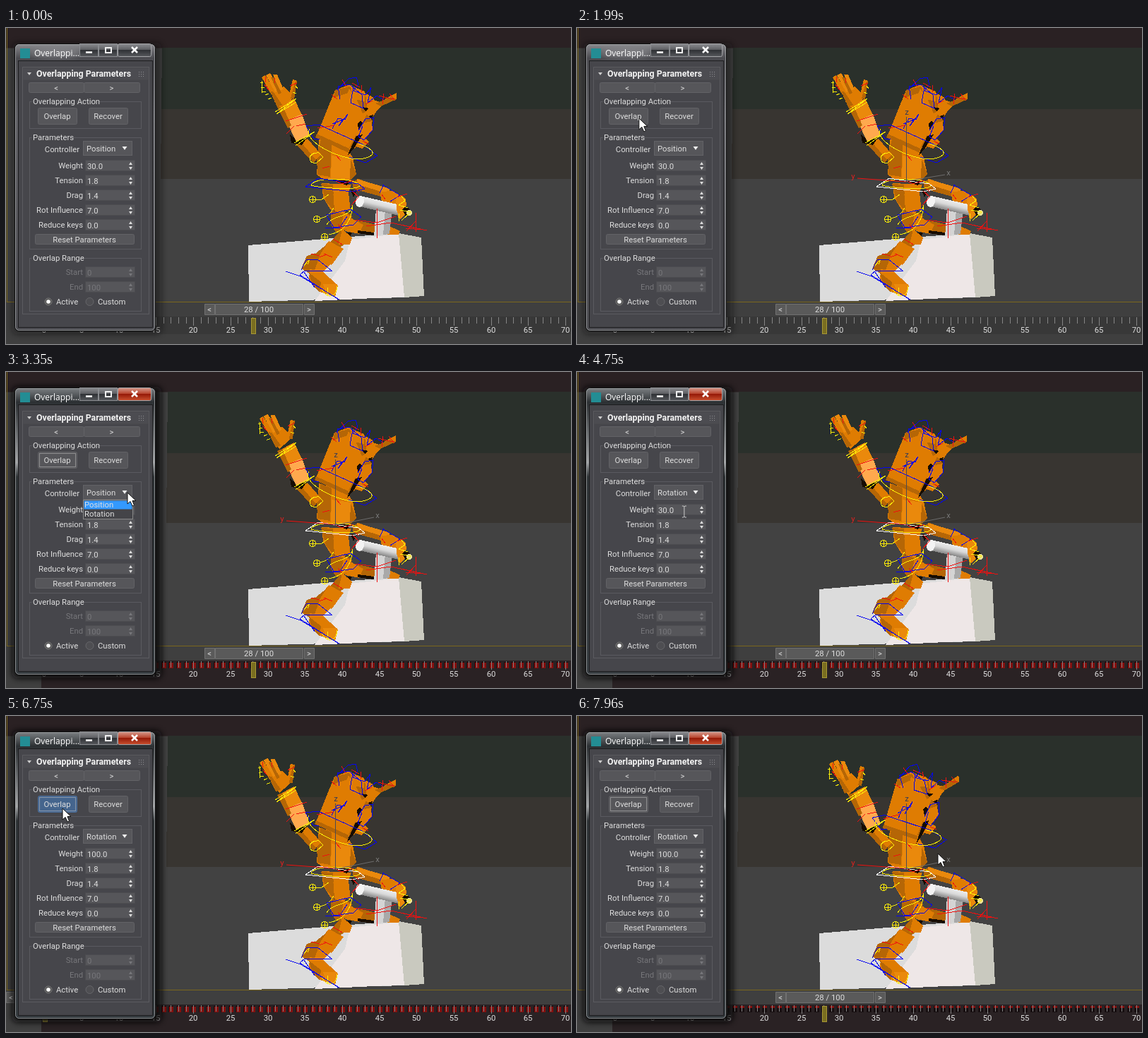
Recreate the animation shown at these times as an HTML page. Size 800 px wide and 448 px high, loop 8000 ms.

```html
<!DOCTYPE html>
<html lang="en">
<head>
<meta charset="utf-8">
<title>Overlapping Parameters</title>
<style>
html, body { margin: 0; width: 100%; height: 100%; overflow: hidden; background: #2a2123; }
svg { display: block; width: 100vw; height: 100vh; }
text { font: 11.3px Roboto, "Noto Sans", sans-serif; fill: #dedede; }
.mid { text-anchor: middle; } .end { text-anchor: end; }
.crisp { shape-rendering: crispEdges; }
.o { fill: #df7c02; } .l { fill: #ea890c; } .h { fill: #ffa94e; } .d { fill: #b56606; } .k { fill: #160c02; }
.b, .y, .r, .w { fill: none; stroke-width: 1; }
.b { stroke: #0505f0; } .y { stroke: #ffee08; } .r { stroke: #f01010; } .w { stroke: #fff; }
.btn { fill: #56565a; stroke: #626266; } .field { fill: #56565a; stroke: #4c4c50; }
.group { fill: none; stroke: #5a5a60; }
.off { fill: #77777b; }
</style>
</head>
<body>
<svg viewBox="0 0 800 448" preserveAspectRatio="none">
<defs>
  <linearGradient id="glassIdle" x2="0" y2="1"><stop stop-color="#8b8b8f"/><stop offset=".05" stop-color="#4b4b50"/><stop offset=".25" stop-color="#606065"/><stop offset="1" stop-color="#4c4c51"/></linearGradient>
  <linearGradient id="glassActive" x2="0" y2="1"><stop stop-color="#7d8184"/><stop offset=".05" stop-color="#2c3033"/><stop offset=".26" stop-color="#a2a4a6"/><stop offset=".31" stop-color="#2f3437"/><stop offset="1" stop-color="#363c40"/></linearGradient>
  <linearGradient id="red" x2="0" y2="1"><stop stop-color="#d79a8c"/><stop offset=".45" stop-color="#b8452f"/><stop offset=".5" stop-color="#961a08"/><stop offset="1" stop-color="#c9502f"/></linearGradient>
  <linearGradient id="grey" x2="0" y2="1"><stop stop-color="#8c8d91"/><stop offset=".48" stop-color="#5b5c60"/><stop offset=".5" stop-color="#303236"/><stop offset="1" stop-color="#56585c"/></linearGradient>
  <linearGradient id="bar" x2="0" y2="1"><stop stop-color="#eee"/><stop offset=".45" stop-color="#d8d8d8"/><stop offset="1" stop-color="#858585"/></linearGradient>
  <filter id="blur" x="-30%" y="-30%" width="160%" height="160%"><feGaussianBlur stdDeviation="4"/></filter>
</defs>

<rect width="800" height="448" fill="#424242"/>
<rect width="800" height="28.5" fill="#2a2123"/>
<g id="bands" class="crisp">
  <path fill="#2a302b" d="M221 28H801V115H220z"/>
  <path fill="#383531" d="M220 115H801V214H219z"/>
</g>

<g id="poseA" class="crisp">
  <path fill="#dcdcdc" d="M343 308 487 296 556 291 564 382 344 388z"/>
  <path fill="#eee7e7" d="M487 300 556 292 564 381 437 387 480 330z"/>
  <path fill="#c9c9bf" d="M556 291 588 297 592 380 564 382z"/>
  <path class="d" d="M484 270 512 276 545 284 558 292 494 291z"/>
  <path class="o" d="M486 268 506 279 500 292 480 288zM541 280 558 288 556 293 540 293z"/>
  <path class="k" d="M498 287 521 290 521 294 498 291zM472 290 490 290 482 306z"/>
  <path fill="#d4d4d4" d="M524 257 537 257 534 293 521 295z"/><path fill="#a9a9a9" d="M537 257 547 256 543 292 534 293z"/>
  <g id="frontArm">
    <path class="d" d="M490 218 500 214 546 232 538 241 492 228z"/>
    <path class="l" d="M497 214 544 228 541 235 498 222z"/>
    <path class="o" d="M529 232 549 231 564 240 563 266 556 271 550 252 532 246z"/>
    <path class="k" d="M488 230 496 231 492 240zM560 255 568 254 573 259 569 267 561 264z"/>
  </g>
  <g transform="translate(501 246) rotate(13)"><rect y="-8" width="57" height="15" fill="url(#bar)"/><ellipse rx="6" ry="8" fill="#f3f3f3"/></g>
  <path class="l" d="M552 237 566 242 567 251 561 257 565 265 558 271 553 258z"/>
  <circle cx="571" cy="262" r="4" fill="#e8df92"/>
  <!-- near leg -->
  <path class="d" d="M460 259 489 263 483 285 468 291 460 279z"/><path class="o" d="M478 262 490 267 484 284 474 289z"/>
  <path class="d" d="M474 287 456 307 466 318 485 301z"/><path class="o" d="M476 285 490 297 487 307 471 307z"/>
  <path class="o" d="M457 302 478 313 461 336 441 322z"/><path class="d" d="M444 315 454 307 437 333 426 330zM426 323 438 319 430 348 418 341z"/>
  <path class="o" d="M436 320 461 333 446 349 427 341z"/><path class="d" d="M436 320 444 324 436 346 424 342z"/>
  <path class="o" d="M430 342 448 345 470 365 466 381 444 374 429 358z"/><path class="d" d="M429 347 446 360 444 375 433 363z"/>
  <path class="l" d="M449 363 469 363 466 380 453 377z"/>
  <!-- body -->
  <path class="o" d="M447 220 489 222 483 238 486 251 478 264 459 257 449 240z"/><path class="d" d="M446 221 463 222 465 260 453 246z"/>
  <path class="o" d="M463 236 485 233 488 260 473 257z"/>
  <path class="o" d="M443 158 483 170 491 184 496 207 487 216 450 215 440 208z"/>
  <path class="d" d="M446 158 461 165 459 211 441 208 440 181zM487 184 496 207 487 216z"/>
  <path class="l" d="M461 181 488 185 487 214 460 213z"/>
  <path class="k" d="M460 215 488 217 482 223z"/>
  <!-- raised arm -->
  <path class="o" d="M410 164 427 157 446 179 435 191z"/><path class="d" d="M410 164 417 161 439 187 435 191z"/>
  <path class="k" d="M402 151 411 158 427 154 419 166 404 163z"/>
  <path class="l" d="M385 112 408 100 419 123 397 133z"/><path class="h" d="M397 132 419 122 430 153 411 161z"/>
  <path class="d" d="M384 112 391 109 404 138 399 142z"/>
  <g id="hand">
    <path class="o" d="M374 89 394 83 408 98 389 114 381 106zM362 70 367 67 383 92 376 95zM401 94 406 73 412 75 407 101z"/>
    <path class="l" d="M368 67 374 64 388 87 381 91zM378 66 384 66 393 87 386 89z"/>
    <path class="d" d="M374 89 379 91 391 109 384 112zM375 70 379 70 390 92 386 94zM409 77 412 75 408 101 403 100z"/>
    <path class="y" d="M360 77H364M361 84H366M362 90H368M367 95 372 93M371 101 376 99M410 82 413 86M406 91 411 93M362 75V92"/>
    <path class="r" d="M367 69V77M380 71V78M402 82 412 78M366 80 372 88"/>
  </g>
  <!-- head -->
  <g id="head">
    <path class="o" d="M466 88 487 80 521 99 524 119 506 145 485 175 440 152z"/>
    <path class="d" d="M440 150 486 171 485 177 438 155z"/>
    <path class="o" d="M468 101 511 121 486 171 443 151z"/>
    <path class="d" d="M511 122 519 132 494 171 486 170zM483 82 507 94 519 113 505 121 496 100zM466 88 487 83 484 92 464 99z"/>
    <path class="o" d="M489 82 508 90 508 104 490 100zM510 99 530 105 545 96 553 92 553 101 531 111 522 120 511 117z"/>
    <path class="d" d="M523 107 545 98 553 101 531 111z"/><path class="o" d="M499 136 518 132 519 145 508 156 514 161 504 171 493 167z"/>
    <path class="k" d="M505 112 514 114 509 118zM498 135 502 131 505 135 499 144zM496 153 505 151 493 170 483 182zM513 125 520 123 518 129z"/>
    <path class="b" d="M468 88 485 72 496 70 499 80 492 89 509 95 517 84 512 106 525 96 535 102M473 101 470 83 487 80 504 95 506 114 488 106 492 83M462 143 470 128 480 130 484 122 471 139 477 130 462 136M499 145 509 129 521 127 519 145 507 159 499 154 505 139"/>
    <path class="r" d="M476 73 482 83M490 78 501 84M461 94 469 101M528 96 548 101M535 93 533 108M543 93 551 103M509 108 519 103M503 81V91M441 142 465 138M505 160 514 165"/>
    <path class="b" d="M425 139 443 137 505 165 526 181 509 191 486 183M425 139 436 157 444 157"/>
    <path class="y" d="M430 143C418 161 480 191 506 185S514 169 499 164"/>
  </g>
  <!-- rig curves -->
  <path class="y" d="M439 243H447L457 236M445 270C455 268 461 261 464 255M457 293C473 290 487 282 491 253M381 119 411 100 383 122 411 105M408 163 437 147 410 167M430 183Q434 176 443 177L449 183 440 191Q430 193 430 183M454 279C462 264 488 270 491 251M560 238 565 245 556 251 569 255M558 258 573 261 560 273M556 263V274M427 335 430 328 418 341M447 370C456 387 468 380 469 366M455 368V379"/>
  <g class="y"><circle cx="434" cy="243" r="4.5"/><circle cx="440" cy="271" r="4.5"/><circle cx="451" cy="296" r="4.5"/><path d="M429 243H439M434 238V248M435 271H445M440 266V276M446 296H456M451 291V301"/></g>
  <path class="y" d="M432 223C434 211 497 211 501 224 492 232 438 225 432 223"/>
  <path id="hipRing" class="b" d="M424 225 442 213 499 221 508 228 491 232 424 225"/>
  <path class="b" d="M454 265 488 257 503 268 492 279 464 283 454 265M452 283 472 284 483 267M396 345 417 352 472 385M418 343 425 329 441 328 461 344H423L416 350 471 385M422 346 437 368M533 222 558 237 544 246M535 222 529 234"/>
  <path class="r" d="M396 132 426 122M397 150 408 139M411 139 424 136M448 199 458 196M467 180 474 188M467 217 476 221 492 216M490 231 500 240M488 252 500 239M470 278 476 285M463 299 476 307M443 325 452 322M450 320 462 325M432 320 444 323M537 243 532 236M553 240 568 235M494 272 525 276 552 267M525 256V298M510 281 545 276 596 287M580 262V289M566 284 589 286M567 288 580 274M494 227 500 233"/>
</g>

<g id="poseB" class="crisp">
  <path fill="#aeb3ad" d="M349 281 413 265 592 277 533 293z"/>
  <path fill="#cdcdc4" d="M349 281 533 293 537 384 353 361z"/>
  <path fill="#dedede" d="M533 293 592 277 595 362 537 384z"/>
  <path class="d" d="M487 246 514 249 513 267 490 263zM541 246 553 250 555 272 542 283z"/>
  <path class="o" d="M493 258 512 260 510 266 491 264z"/><path class="k" d="M544 250 551 254 550 273 544 271z"/>
  <path fill="#d4d4cf" d="M512 245 543 242 542 283 526 289 511 286z"/>
  <path class="o" d="M455 207 487 211 483 231 492 249 478 264 457 248z"/><path class="d" d="M454 207 467 209 471 250 458 245zM456 252 476 263 476 294 464 290 457 270z"/>
  <path class="o" d="M465 263 477 270 482 292 468 312 446 302 461 292z"/>
  <path class="o" d="M455 292 477 302 451 326 430 318z"/><path class="d" d="M452 291 465 289 425 323 407 331 420 313z"/>
  <path class="o" d="M420 313 449 321 430 334 408 334zM410 330 426 329 447 362 455 367 452 377 430 375 421 355z"/>
  <path class="d" d="M408 332 416 332 434 363 436 376 421 362z"/><path class="o" d="M424 330 432 328 452 360 440 364z"/>
  <path class="l" d="M447 150 505 160 498 190 486 213 457 209 446 187z"/>
  <path class="d" d="M447 150 468 155 463 192 444 187z"/><path class="o" d="M461 190 490 194 486 214 457 208z"/>
  <path class="k" d="M455 190 465 192 462 196zM480 156 505 159 503 166z"/>
  <path class="d" d="M500 178 510 182 538 203 530 215 497 190z"/><path class="l" d="M507 180 541 201 534 208 503 187z"/>
  <path class="o" d="M529 205 547 207 563 216 571 223 568 243 547 236 530 220z"/>
  <g transform="translate(471 254) rotate(-14)"><rect y="-7" width="86" height="13" fill="url(#bar)"/><rect x="104" y="-6" width="17" height="12" fill="#ddd"/><ellipse rx="5" ry="7" fill="#eee"/></g>
  <path class="l" d="M540 209 562 219 574 219 569 228 575 235 559 242 547 228z"/><path class="d" d="M548 221 556 230 565 236 557 240z"/>
  <path class="o" d="M411 137 428 129 449 153 439 159 421 149z"/><path class="k" d="M402 132 413 140 434 134 419 143 402 137z"/>
  <path class="h" d="M380 86 405 75 429 128 404 139z"/><path class="l" d="M394 72 404 74 408 84 384 95 380 86z"/>
  <path class="h" d="M366 58 391 52 402 68 387 84 371 76zM356 42 361 39 374 58 368 62zM361 35 367 32 382 56 375 60zM372 31 377 31 388 53 381 56zM382 35 387 35 396 57 389 59z"/>
  <path class="d" d="M397 59 400 44 407 47 405 76 398 69zM367 34 370 34 381 56 378 59zM377 33 380 34 389 55 386 57z"/>
  <path class="o" d="M463 71 479 53 503 45 523 57 523 74 530 91 523 141 490 154 448 127z"/>
  <path class="o" d="M465 69 504 88 488 151 449 127z"/><path class="d" d="M504 88 529 90 522 142 489 152zM469 63 489 52 505 65 523 59 522 79 503 88 480 78z"/>
  <path class="o" d="M478 53 499 46 519 56 500 63zM496 65 523 60 521 75 500 81zM499 103 526 101 527 118 511 133 523 139 501 144 490 135z"/>
  <path class="l" d="M520 73 547 67 548 75 524 83z"/><path class="k" d="M505 86 527 84 522 89zM504 122 512 117 506 132zM492 148 522 143 494 153z"/>
  <path class="b" d="M467 62 480 42 509 39 535 59 527 79 503 92 473 76zM472 78 483 54 517 51 524 69 510 86 490 66 480 65M499 120 504 102 525 105 527 126M456 119 468 105 475 108M457 113 469 121 465 132M424 118 448 111 535 139 537 158 496 153 435 140zM388 330 409 326 448 364 456 375 429 379zM409 332 452 342H425L408 325M465 245 493 236 515 248 487 260zM542 200 559 208 545 222"/>
  <path class="r" d="M503 72H515M509 66V80M534 74H546M540 68V80"/>
  <path class="y" d="M433 116C426 153 513 177 525 149 526 138 519 133 515 132M378 95 411 76M398 137 430 124M383 64 392 78 407 59M403 60H414M448 211 462 222M449 240 473 235 473 218M455 269 479 257 485 234M448 364Q437 373 449 376 460 366 448 364M529 216 572 218M555 236 564 248 571 238 559 251 573 247M431 157 437 151 447 159 440 163z"/>
  <g class="y"><circle cx="444" cy="211" r="4.5"/><circle cx="446" cy="241" r="4.5"/><circle cx="450" cy="270" r="4.5"/><path d="M439 211H449M444 206V216M441 241H451M446 236V246M445 270H455M450 265V275"/></g>
  <path class="w" stroke-width="2" d="M429 188 438 186 501 194 508 202 486 201 429 192z"/>
  <path class="r" d="M382 88 396 79M393 107 412 98M392 116 407 114M470 150 476 158M468 193V205M477 196 486 206M511 179V193M506 211 523 204M536 205 550 195M538 210 554 219M462 283 479 300M444 296 465 307M437 301 452 317M416 324 420 308M469 61 482 66M492 43 507 52M486 55 490 68M504 69 513 75M521 72 545 74M536 68V82M566 216V231M507 209 515 221M525 255V294M510 276 543 272M512 266 542 281"/>
</g>

<g id="axes">
  <path class="r" id="axisY"/><path id="axisZ" stroke="#4b4a52"/><path id="axisX" stroke="#6c6c6c"/>
  <text id="labelY" class="mid" style="fill:#d22">y</text><text id="labelZ" class="mid" style="fill:#333a58">z</text><text id="labelX" class="mid" style="fill:#777">x</text>
</g>

<path class="crisp" fill="none" stroke="#7b671c" d="M1.500 0V388.500H800"/>
<rect y="389" width="800" height="59" fill="#3f3f3f"/>
<rect id="strip" x="50" y="409" width="750" height="39"/>
<g id="keys" class="crisp"><g id="keyBacks"></g><g id="keyTops"></g></g><g id="ruler"></g>
<g id="thumb">
  <path fill="#5a5a5a" stroke="#707070" d="M281.500 391.500H295.500V406.500H281.500zM296.500 391.500H420.500V406.500H296.500zM422.500 391.500H436.500V406.500H422.500z"/>
  <text class="mid" x="288" y="403">&lt;</text><text class="mid" x="358" y="403">28 / 100</text><text class="mid" x="429" y="403">&gt;</text>
</g>
<rect id="marker" x="347.500" y="411.500" width="6" height="22" fill="#796d20" stroke="#a79835"/>

<g id="panel"></g>
<path id="arrow" fill="#fff" stroke="#111" d="M0 0V16L4 12.500 7 19 9.500 18 7 11.500H12z"/>
<path id="beam" fill="none" stroke="#ccc" d="M-3 -8H-1L0 -7 1 -8H3M0 -7V7M-3 8H-1L0 7 1 8H3"/>
</svg>

<script>
const $ = id => document.getElementById(id);
const show = (id, on) => $(id).style.display = on ? '' : 'none';
const move = (id, x, y) => $(id).setAttribute('transform', `translate(${x} ${y})`);
const rect = (x, y, w, h, attrs) => `<rect x="${x + .5}" y="${y + .5}" width="${w}" height="${h}" ${attrs}/>`;
const text = (x, y, s, attrs = '') => `<text x="${x}" y="${y}" ${attrs}>${s}</text>`;
const button = (x, y, w, h, label, id = '') =>
  rect(x, y, w, h, `class="btn" rx="2" id="${id}"`) + text(x + w / 2, y + h / 2 + 4.5, label, 'class="mid"');
const group = (y, h, label) => rect(33, y, 158, h, 'class="group"') +
  rect(36, y - 4, label.length * 5.3, 8, 'fill="#46464b"') + text(38, y + 4, label);
const spinner = (y, label, value, off = '', id = '') => text(109, y + 4, label, `class="end ${off}"`) +
  rect(112, y - 8, 70, 15, 'class="field"') + text(115, y + 4.5, value, `class="${off}" id="${id}"`) +
  `<path fill="${off ? '#77777b' : '#ddd'}" d="M174 ${y - 1}l2.500 -4 2.500 4zM174 ${y + 2}l2.500 4 2.500 -4z"/>`;

const frameX = f => 54.3 + 10.54 * f;
let ruler = '', keyBacks = '', keyTops = '';
for (let f = 0; f <= 71; f++) {
  const x = Math.round(frameX(f)), major = f % 5 === 0;
  ruler += `<path stroke="#858585" d="M${x + .5} 410V${major ? 422 : 419}"/>`;
  if (major) ruler += text(x, 432, f, 'class="mid"');
  keyBacks += rect(x - 4, 410, 7, 9, 'fill="#170f11"');
  keyTops += rect(x - 3, 411, 6, 8, 'fill="#85100f"');
}
$('ruler').innerHTML = ruler;
$('keyBacks').innerHTML = keyBacks;
$('keyTops').innerHTML = keyTops;

$('panel').innerHTML =
  rect(8, 20, 212, 414, 'id="shadow" rx="8" fill="#08070c" filter="url(#blur)"') +
  rect(12, 22, 199, 407, 'id="frame" rx="6" stroke="#0b0b0c"') +
  rect(13, 23, 197, 405, 'rx="5" fill="none" stroke="#a9abad" opacity=".75"') +
  '<ellipse id="glow" cx="70" cy="36" rx="34" ry="7" fill="#9b9b9f" opacity=".45" filter="url(#blur)"/>' +
  '<rect x="20" y="29" width="14" height="14" fill="#238d94"/>' +
  text(40, 40, 'Overlappi...', 'style="font-size:12px;font-family:\'Open Sans\',sans-serif;fill:#fff"') +
  rect(104, 22, 26, 18, 'fill="url(#grey)" stroke="#8a8c90"') + rect(131, 22, 26, 18, 'fill="url(#grey)" stroke="#8a8c90"') +
  rect(158, 22, 47, 18, 'id="close" stroke="#a3a3a6" rx="2"') +
  '<path stroke="#fff" stroke-width="2.500" fill="none" d="M113 34.500H122M178 27 186 35M186 27 178 35"/><path stroke="#eee" stroke-width="2" fill="none" d="M141 28H149V35H141z"/>' +
  rect(17, 46, 190, 378, 'fill="#46464b" stroke="#1c1c1e"') +
  rect(23, 55, 179, 350, 'fill="none" stroke="#5b5b60"') + rect(24, 56, 177, 17, 'fill="#4c4c51"') +
  '<path fill="#ccc" d="M30 63h6l-3 4z"/><path stroke="#909094" stroke-dasharray="1 2" d="M188 62.500H195M188 65.500H195M188 68.500H195"/>' +
  text(43, 69, 'Overlapping Parameters', 'style="font-weight:700;font-size:12.3px;fill:#f3f3f3"') +
  button(32, 77, 78, 14, '&lt;') + button(110, 77, 79, 14, '&gt;') +
  group(104, 38, 'Overlapping Action') + button(45, 113, 55, 23, 'Overlap', 'overlap') + button(117, 113, 55, 23, 'Recover') +
  rect(47, 115, 51, 19, 'id="focus" fill="none" stroke="#c9c9c9" stroke-dasharray="1 1"') +
  group(155, 158, 'Parameters') + text(104, 176, 'Controller', 'class="end"') +
  rect(109, 160, 69, 20, 'class="btn"') + text(114, 175, '', 'id="controller"') + '<path fill="#eee" d="M164.500 168h7l-3.500 5z"/>' +
  spinner(195, 'Weight', '', '', 'weight') + spinner(216, 'Tension', '1.8') + spinner(237, 'Drag', '1.4') +
  spinner(258, 'Rot Influence', '7.0') + spinner(279, 'Reduce keys', '0.0') + button(41, 292, 140, 14, 'Reset Parameters') +
  group(326, 75, 'Overlap Range') + spinner(346, 'Start', '0', 'off') + spinner(367, 'End', '100', 'off') +
  '<circle cx="60" cy="388" r="5" fill="#555" stroke="#777"/><circle cx="60" cy="388" r="2.800" fill="#fff"/><circle cx="118.500" cy="388" r="5.500" fill="#4e4e52" stroke="#66666a"/>' +
  text(71, 392, 'Active') + text(130, 392, 'Custom') +
  '<g id="popup">' + rect(109, 181, 70, 27, 'fill="#444448" stroke="#888"') + rect(110, 182, 68, 12, 'id="hover" fill="#39f"') +
  text(111, 192, 'Position') + text(111, 205, 'Rotation') + '</g>';

// Cursor waypoints: time, x, y
const path = [[330, 772, 212], [640, 590, 232], [930, 414, 226], [1010, 426, 222], [1750, 426, 222], [1990, 88, 128],
  [2090, 68, 122], [2590, 68, 122], [3230, 172, 171], [3680, 172, 171], [3840, 158, 205], [4460, 158, 205], [4500, 152, 190],
  [4750, 152, 198], [5000, 115, 198], [5590, 115, 198], [6430, 84, 138], [6620, 80, 131], [7080, 80, 131],
  [7840, 511, 276], [7960, 511, 195]];
function cursorAt(t) {
  const i = path.findIndex(p => p[0] > t);
  if (i < 0) return path[path.length - 1].slice(1);
  if (i === 0) return path[0].slice(1);
  const [t0, x0, y0] = path[i - 1], [t1, x1, y1] = path[i];
  const u = (t - t0) / (t1 - t0), e = t1 - t0 > 500 ? u * u * (3 - 2 * u) : u;
  return [x0 + (x1 - x0) * e, y0 + (y1 - y0) * e];
}
const line = (id, x, y, x2, y2) => $(id).setAttribute('d', `M${x} ${y}L${x2} ${y2}`);
const label = (id, x, y) => { $(id).setAttribute('x', x); $(id).setAttribute('y', y); };

function draw(t) {
  const between = (a, b) => t >= a && t < b;
  const active = t >= 2310, rewound = between(2350, 2550) || between(6710, 7040);
  const start = between(2350, 2590) || between(6790, 7040);
  const pressed = between(2310, 2550) || between(6670, 7040);
  const stage = t >= 7040 ? 2 : t >= 2590 ? 1 : 0;

  show('poseA', !start); show('poseB', start);
  $('hand').setAttribute('transform', ['', 'translate(-2 -5) rotate(-2 390 105)', 'translate(-5 -2)'][stage]);
  $('head').setAttribute('transform', ['', 'translate(-1 -2)', 'translate(-4 1) rotate(-6 465 170)'][stage]);
  $('hipRing').setAttribute('class', t >= 1460 ? 'w' : 'b');
  show('axes', t >= 1460);
  if (start) {
    line('axisY', 397, 188, 466, 192); line('axisZ', 467, 191, 469, 98); line('axisX', 467, 191, 522, 182);
    label('labelY', 393, 188); label('labelZ', 469, 96); label('labelX', 528, 184);
  } else {
    const dy = stage ? -2 : 0;
    line('axisY', 397, 213 + dy, 466, 218 + dy); line('axisZ', 466.5, 217, 466.5, 126 + dy); line('axisX', 467, 217, 521, 208 + dy);
    label('labelY', 391, 214 + dy); label('labelZ', 467, 123 + dy); label('labelX', 526, 209 + dy);
  }
  move('bands', active ? 8 : 0, 0);
  move('thumb', rewound ? -281 : 0, 0);
  move('marker', rewound ? -295 : 0, 0);
  show('keys', t >= 2550);
  $('keyTops').setAttribute('transform', stage === 2 ? 'translate(0 267) scale(1 .35)' : '');
  $('strip').setAttribute('fill', active ? '#2a2224' : '#383838');
  $('strip').setAttribute('height', active ? 39 : 25);

  $('frame').setAttribute('fill', `url(#glass${active ? 'Active' : 'Idle'})`);
  $('close').setAttribute('fill', active ? 'url(#red)' : 'url(#grey)');
  $('shadow').setAttribute('opacity', active ? .9 : .45);
  show('glow', !active);
  $('overlap').style.fill = pressed ? '#45658d' : '';
  $('overlap').style.stroke = pressed ? '#4d6f9b' : '';
  show('focus', between(2310, 4210) || t >= 6670);

  $('controller').textContent = t < 4210 ? 'Position' : 'Rotation';
  show('popup', between(3310, 4210));
  move('hover', 0, t >= 3760 ? 13 : 0);
  $('weight').textContent = t < 5150 ? '30.0' : t < 5290 ? '1' : t < 5430 ? '10' : t < 5590 ? '100' : '100.0';

  const [x, y] = cursorAt(t), typing = between(4460, 5700);
  show('arrow', t >= 330 && !typing); show('beam', typing);
  move('arrow', x, y); move('beam', x, y);
}
function loop(now) {
  draw(now % 8000);
  requestAnimationFrame(loop);
}
draw(0);
requestAnimationFrame(loop);
</script>
</body>
</html>
```
